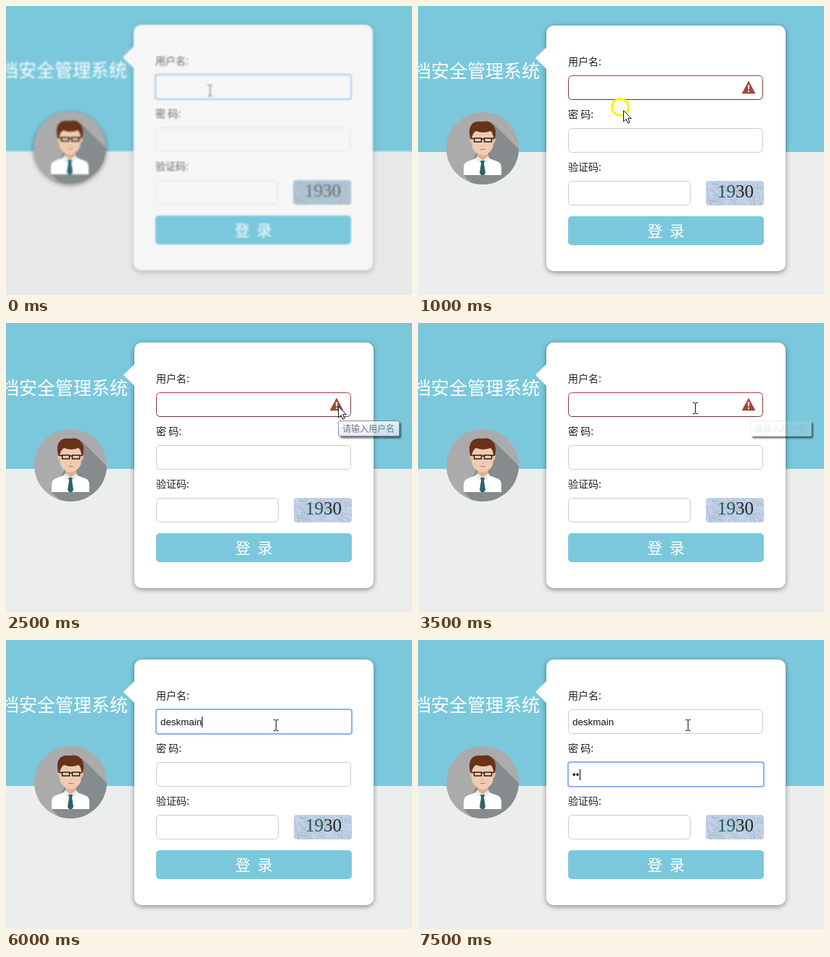
An HTML page with a canvas that plays this animation: 560 px wide and 400 px high, repeating every 8000 ms.

```html
<!DOCTYPE html>
<html lang="zh-CN">
<head>
<meta charset="utf-8">
<title>登录</title>
<style>
html, body { margin: 0; width: 560px; height: 400px; overflow: hidden; background: #eceeed; }
canvas { display: block; }
</style>
</head>
<body>
<canvas id="stage" width="560" height="400"></canvas>
<script>
const canvas = document.getElementById('stage');
const c = canvas.getContext('2d');
const CJK = '"Noto Sans CJK SC", "Noto Sans CJK", sans-serif';
const ARIAL = '"Liberation Sans", Arial, sans-serif';
const SERIF = '"Liberation Serif", "Times New Roman", serif';
const BLUE = '#7bc8dc';
const LOOP = 8000, STEP = 500;
const USER = 'deskmain';

const SHARP = { page: '#eceeed', card: '#fff', line: '#ccc', focus: '#8fb2ee', ink: '#222', shade: 0.42 };
const SOFT = { page: '#e8e8e8', card: '#f6f6f6', line: '#e2e2e2', focus: '#a3cdef', ink: '#666', shade: 0.25 };

// One entry per half second
const steps = [
  { soft: true, focus: 'user', beam: [282, 118] },
  { focus: 'user', caret: true, arrow: [271, 134] },
  { error: true, ring: [279, 140], arrow: [283, 144] },
  { error: true, arrow: [392, 132] },
  { error: true, arrow: [458, 115] },
  { error: true, arrow: [458, 115], tip: 0.78 },
  { error: true, arrow: [458, 115], tip: 1 },
  { error: true, beam: [382, 118], tip: 0.12 },
  ...[0, 2, 4, 7, 8].map(typed => ({ focus: 'user', caret: true, typed, beam: [372, 118] })),
  ...[0, 1, 2].map(dots => ({ focus: 'pass', caret: true, typed: 8, dots, beam: [372, 118] }))
];

function text(str, x, y, font, color, align = 'left') {
  c.font = font;
  c.fillStyle = color;
  c.textAlign = align;
  c.fillText(str, x, y);
}

function box(x, y, w, h, r, fill, stroke, width = 1) {
  c.beginPath();
  c.roundRect(x, y, w, h, r);
  if (fill) { c.fillStyle = fill; c.fill(); }
  if (stroke) { c.strokeStyle = stroke; c.lineWidth = width; c.stroke(); }
}

function shape(d, fill, stroke, width = 1) {
  const p = new Path2D(d);
  if (fill) { c.fillStyle = fill; c.fill(p); }
  if (stroke) { c.strokeStyle = stroke; c.lineWidth = width; c.stroke(p); }
}

function shadow(alpha, blur, dy) {
  c.shadowColor = `rgba(0,0,0,${alpha})`;
  c.shadowBlur = blur;
  c.shadowOffsetY = dy;
}

function avatar(soft) {
  c.save();
  if (soft) shadow(0.4, 6, 2);
  c.beginPath();
  c.arc(89, 197, 50, 0, Math.PI * 2);
  c.fillStyle = '#ababab';
  c.fill();
  c.shadowColor = 'transparent';
  c.clip();
  shape('M104 163 L150 209 V250 H79 L63 234 Z', '#868b8d');
  shape('M63 234 V224 Q63 217 69 215 L82 210 H96 L109 215 Q115 217 115 224 V234 Z', '#fff');
  shape('M82 198 H97 V210 L89 216 L82 210 Z', '#dfb192');
  shape('M82 208 L89 214 L84 218 L79 211 Z M97 208 L89 214 L94 218 L99 211 Z', '#e9eef0');
  shape('M86 214 H92 L91 218 L93 231 L91 234 H87 L85 231 L87 218 Z', '#2b626d');
  shape('M74 172 H104 V190 Q104 200 95 205 Q89 208 83 205 Q74 200 74 190 Z', '#f0cbb0');
  shape('M71 183 H75 V191 Q71 190 71 183 Z M107 183 H103 V191 Q107 190 107 183 Z', '#e8bd9f');
  shape('M72 184 Q69 169 74 164 Q78 159 88 160 Q99 158 104 165 Q109 171 106 184 L104 184 Q104 176 100 173 Q90 177 80 173 Q75 176 74 184 Z', '#68331a');
  shape('M77.5 183 H87.5 V188 H77.5 Z M91.5 183 H101.5 V188 H91.5 Z M87.5 184 H91.5 M74 183.5 H77 M102 183.5 H104', '', '#222', 1.5);
  shape('M86 198.5 H93', '', '#b9776a', 1);
  shape('M88 194 H91', '', '#d9a98d', 1);
  c.restore();
}

function captcha(soft) {
  c.save();
  c.beginPath();
  c.roundRect(397, 242, 80, 34, 4);
  c.clip();
  c.fillStyle = soft ? '#aec6d6' : '#c0d2ec';
  c.fillRect(397, 242, 80, 34);
  let seed = 29;
  const rnd = n => (seed = seed * 16807 % 2147483647) / 2147483647 * n;
  c.lineWidth = 0.8;
  for (let i = 0; i < 150; i++) {
    const x = 397 + rnd(80), y = 242 + rnd(34);
    c.strokeStyle = `rgb(${150 + rnd(50)},${168 + rnd(40)},${165 + rnd(55)})`;
    c.beginPath();
    c.moveTo(x, y);
    c.lineTo(x + rnd(12), y + rnd(12));
    c.stroke();
  }
  text('19', 413, 265, '25px ' + SERIF, soft ? '#5f7379' : '#1d5a5c');
  text('30', 438, 265, '25px ' + SERIF, soft ? '#5f686e' : '#1e2b2c');
  c.restore();
}

function field(y, w, pal, focused, error) {
  if (focused) {
    box(207, y, w + 1, 34, 3, pal.card, pal.focus, 2);
    return;
  }
  let line = pal.line;
  if (error) {
    line = c.createLinearGradient(0, y, 0, y + 34);
    line.addColorStop(0, '#b03a3a');
    line.addColorStop(1, '#633336');
  }
  box(207.5, y + 0.5, w - 1, 33, 5, pal.card, line);
}

function warning() {
  shape('M456 104 L465 121 H447 Z', '#a0463f', '#a0463f', 0.6);
  shape('M454.7 109.5 H457.3 L456.8 115.5 H455.2 Z M455 117 H457 V119 H455 Z', '#fff');
}

function tooltip(alpha) {
  c.save();
  c.beginPath();
  c.rect(0, 0, 560, 400);
  c.roundRect(458, 135, 85, 22, 2);
  c.clip('evenodd');
  c.filter = 'blur(1px)';
  box(461, 138, 84, 21.5, 2, 'rgba(0,0,0,.55)');
  c.restore();
  c.save();
  c.globalAlpha = alpha;
  const g = c.createLinearGradient(0, 135, 0, 157);
  g.addColorStop(0, '#fff');
  g.addColorStop(1, '#dfe5f0');
  box(458.5, 135.5, 84, 21, 2, g, '#6c6f76');
  text('请输入用户名', 464, 150.5, '12px ' + CJK, '#50586a');
  c.restore();
}

function arrow([x, y]) {
  c.save();
  c.translate(x, y);
  shape('M.5 .7 V16 L4.1 12.6 L6.5 18.2 L9 17.1 L6.6 11.6 H11.3 Z', '#fff', '#111');
  c.restore();
}

function beam([x, y], color) {
  c.save();
  c.translate(x, y);
  shape('M-3 -7.5 H0 M1 -7.5 H4 M.5 -7 V7 M-3 7.5 H0 M1 7.5 H4', '', color);
  c.restore();
}

function caret(x, y) {
  c.fillStyle = '#000';
  c.fillRect(Math.floor(x), y, 1, 15);
}

function draw(s) {
  const pal = s.soft ? SOFT : SHARP;
  c.fillStyle = pal.page;
  c.fillRect(0, 0, 560, 400);
  c.fillStyle = BLUE;
  c.fillRect(0, 0, 560, 202);
  text('档安全管理系统', -7, 99, '25px ' + CJK, '#fff');
  avatar(s.soft);

  c.save();
  shadow(pal.shade, 7, 2);
  box(177, 27, 330, 340, 10, pal.card);
  c.restore();
  shape('M162 72 L177.5 56.5 V87.5 Z', pal.card);

  const label = '14px ' + CJK;
  text('用户名:', 207, 82, label, pal.ink);
  text('密 码:', 207, 155, label, pal.ink);
  text('验证码:', 207, 228, label, pal.ink);
  field(96, 269, pal, s.focus === 'user', s.error);
  field(169, 269, pal, s.focus === 'pass');
  field(242, 169, pal);
  captcha(s.soft);
  box(207, 291, 270, 40, 5, BLUE);
  text('登  录', 342, 319, '21px ' + CJK, '#fff', 'center');

  const font = '13.333px ' + ARIAL;
  const name = USER.slice(0, s.typed || 0);
  const dots = '•'.repeat(s.dots || 0);
  text(name, 213, 118, font, '#111');
  const nameEnd = 213 + c.measureText(name).width;
  text(dots, 213, 191, font, '#111');
  const dotsEnd = 213 + c.measureText(dots).width + 0.7;
  if (s.caret) {
    if (s.focus === 'user') caret(nameEnd, 106);
    else caret(dotsEnd, 179);
  }

  if (s.error) warning();
  if (s.tip) tooltip(s.tip);
  if (s.ring) {
    c.beginPath();
    c.arc(...s.ring, 11.5, 0, Math.PI * 2);
    c.strokeStyle = '#fbf400';
    c.lineWidth = 3;
    c.stroke();
  }
  if (s.arrow) arrow(s.arrow);
  if (s.beam) beam(s.beam, s.soft ? '#666' : '#111');

  if (s.soft) {
    c.save();
    c.filter = 'blur(0.9px)';
    c.drawImage(canvas, -1, -1);
    c.restore();
  }
}

function tick() {
  draw(steps[Math.floor(performance.now() % LOOP / STEP)]);
  requestAnimationFrame(tick);
}
tick();
</script>
</body>
</html>
```
